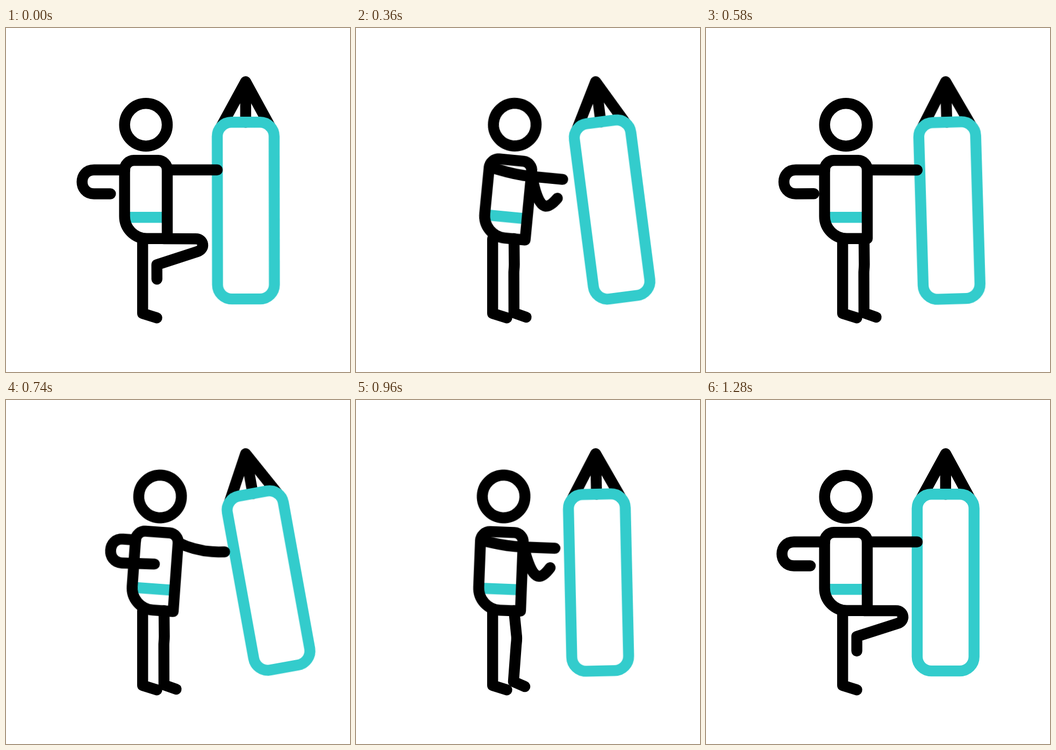
These frames come from a looping animation (640 by 640 pixels, 2400 ms). An HTML page:

```html
<!DOCTYPE html>
<html lang="en">
<head>
<meta charset="utf-8">
<title>Boxing practice</title>
<style>
  html, body { margin: 0; width: 100%; height: 100%; overflow: hidden; background: #fff; }
  svg {
    display: block; width: 100%; height: 100%;
    fill: none; stroke: #000; stroke-width: 20.4;
    stroke-linecap: round; stroke-linejoin: round;
  }
  .teal { stroke: #33cccc; }
  .belt { stroke-linecap: butt; }

  .bag, .body, .front, .back, .knee { animation: 2400ms linear infinite; }
  .bag { animation-name: swing; transform-origin: 445.8px 100px; }
  .body { animation-name: lean; transform-origin: 280px 545px; }
  .front { animation-name: front; }
  .back { animation-name: back; }
  .knee { animation-name: knee; }

  /* The bag hangs straight at each hit and swings out between hits. */
  @keyframes swing {
    0%, 11.9%, 22.9%, 40.8%, 53.3%, 100% { transform: none; }
    5.8%, 17.5%, 33.1%, 46.7% { transform: rotate(-13.1deg); }
  }

  @keyframes lean {
    0%, 22.9%, 24.2%, 44.6%, 100% { transform: rotate(0deg); animation-timing-function: ease-in-out; }
    11.9%, 15%, 34.4% { transform: rotate(5.5deg); animation-timing-function: ease-in-out; }
  }

  /* Each arm has three poses: one side's punch, halfway, the other side's punch. */
  @keyframes front {
    0%, 22.9%, 53.3%, 100% {
      d: path("M300 264 C331 264 362 264 393 264");
      animation-timing-function: cubic-bezier(.7, 0, 1, 1);
    }
    5.8%, 19%, 33.75%, 46.7% { d: path("M300 262 C320 285 347 294 381 286"); }
    11.9%, 15%, 40%, 41% { d: path("M300 268 C320 339 335 334 352 309"); }
  }

  @keyframes back {
    0%, 22.9%, 53.3%, 100% {
      d: path("M221 264 L163.5 264 C134 264 134 308.5 163.5 308.5 L194 308.5");
      animation-timing-function: cubic-bezier(.4, .2, .8, .8);
    }
    5.8%, 19%, 33.75%, 46.7% { d: path("M221 264 L212 264 C184 264 184 309 214 308.5 L288 305"); }
    11.9%, 15%, 40%, 41% { d: path("M221 263 L240 266.5 C258 270 275 272.5 300 272.5 L359.5 272.5"); }
  }

  @keyframes knee {
    0%, 47.4%, 100% { d: path("M294 392 L353 392 C369 392 371 411 357 415.5 L280.6 440 L280.6 467"); }
    8.3%, 39.5% { d: path("M294 392 L294.5 440 C294.5 448 293.4 452 293.7 458 L293.9 530 L316.5 538"); }
  }
</style>
</head>
<body>
<svg viewBox="0 0 640 640">
  <g class="bag">
    <path d="M400.4 183 L445.8 100 L491 183 M445.8 100 V175.3"/>
    <rect class="teal" x="392.9" y="175.3" width="105.8" height="328.8" rx="26.5"/>
  </g>
  <path d="M254.2 392 V531 L280.6 539.3"/>
  <path class="knee"/>
  <g class="body">
    <path class="teal belt" d="M224 352.2 H298"/>
    <circle cx="260.3" cy="180" r="39.7"/>
    <path d="M300 391.8 H262 A41.5 41.5 0 0 1 220.6 350 V264 A17.6 17.6 0 0 1 238 246.3 H283 A17.3 17.3 0 0 1 300 264 Z"/>
    <path class="back"/>
    <path class="front"/>
  </g>
</svg>
</body>
</html>
```
